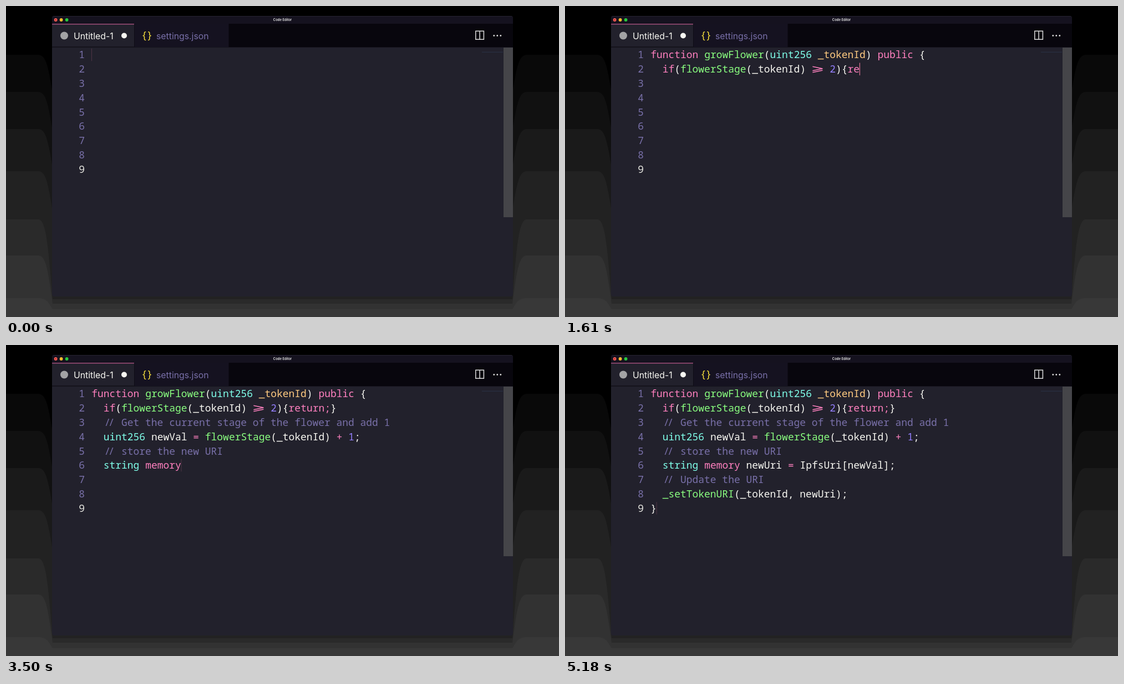
Write an HTML page that moves like this. It is 997 px wide and 561 px high and loops after 5.25 s.

```html
<!DOCTYPE html>
<html lang="en">
<head>
<meta charset="utf-8">
<title>Code Editor</title>
<style>
  html, body { margin: 0; width: 100%; height: 100%; overflow: hidden; background: #000; }
  svg { display: block; width: 997px; height: 561px; }
  .mono { font: 500 17.95px "Noto Sans Mono", "DejaVu Sans Mono", monospace; font-variant-ligatures: none; }
  .mono text { white-space: pre; }
  .ui { font: 15.8px Inter, Roboto, sans-serif; }
</style>
</head>
<body>
<svg viewBox="0 0 997 561" xmlns="http://www.w3.org/2000/svg">
  <rect width="997" height="561" fill="#000"/>
  <g id="backdrop"></g>
  <clipPath id="frame"><rect x="83" y="18" width="831" height="506" rx="4"/></clipPath>
  <g clip-path="url(#frame)">
    <rect x="83" y="18" width="831" height="506" fill="#22212c"/>
    <rect x="83" y="18" width="831" height="14" fill="#15121f"/>
    <rect x="83" y="18" width="831" height="0.8" fill="#2b2936"/>
    <rect x="83" y="32" width="831" height="42.5" fill="#08060d"/>
    <rect x="83" y="32" width="148" height="41.5" fill="#22212c"/>
    <rect x="231.5" y="32" width="170" height="42" fill="#151220"/>
    <rect x="83" y="32" width="148" height="1.4" fill="#a8507f"/>
  </g>
  <circle cx="89.6" cy="25" r="2.9" fill="#ff5f57"/>
  <circle cx="89.6" cy="25" r="1" fill="#7c1512"/>
  <circle cx="99.6" cy="25" r="2.9" fill="#febc2e"/>
  <circle cx="109.6" cy="25" r="2.9" fill="#28c840"/>
  <g class="ui">
    <text x="498.5" y="27.3" text-anchor="middle" fill="#eee" style="font-size:5.9px;font-weight:600">Code Editor</text>
    <text x="122" y="59.5" fill="#f8f8f2">Untitled-1</text>
    <text x="271" y="59.5" fill="#7970a9">settings.json</text>
  </g>
  <circle cx="105" cy="53.5" r="7" fill="#a3a3a5"/>
  <circle cx="213" cy="53.5" r="5" fill="#f8f8f2"/>
  <g class="mono" fill="#f5de3c" text-anchor="middle">
    <text x="249.5" y="59">{</text>
    <text x="258.8" y="59">}</text>
  </g>
  <path d="M846.8 45.3h14.6v15h-14.6zM854.1 45.3v15" fill="none" stroke="#dcdcdc" stroke-width="1.5"/>
  <g fill="#dcdcdc">
    <circle cx="879.8" cy="53.5" r="1.4"/>
    <circle cx="885.8" cy="53.5" r="1.4"/>
    <circle cx="891.8" cy="53.5" r="1.4"/>
  </g>
  <rect x="858" y="82.7" width="38" height="1" fill="#2c3348"/>
  <rect x="897" y="75" width="17" height="306" fill="#454549"/>
  <g id="numbers" class="mono" text-anchor="end"></g>
  <g id="code" class="mono"></g>
  <rect id="caret" width="1.1" height="22.6" fill="#ff80a8"/>
</svg>
<script>
const LOOP = 5250, STEP = 70;
const LEFT = 154.2, CHAR = 10.77, BASE = 94.4, PITCH = 25.8;
const RATE = 5.48, START = 11 - 13.3 / RATE;  // characters per step, first step
const PINK = '#ff80bf', GREEN = '#8aff80', CYAN = '#80ffea', ORANGE = '#ffca80',
      PURPLE = '#9580ff', WHITE = '#f8f8f2', GREY = '#7970a9';

// Each line: indent, pause after it (in characters), coloured runs.
const lines = [
  [0, 0, [PINK, 'function '], [GREEN, 'growFlower'], [WHITE, '('], [CYAN, 'uint256 '],
    [ORANGE, '_tokenId'], [WHITE, ') '], [PINK, 'public '], [WHITE, '{']],
  [2, 0, [PINK, 'if'], [WHITE, '('], [GREEN, 'flowerStage'], [WHITE, '(_tokenId) '],
    [PINK, '>='], [WHITE, ' '], [PURPLE, '2'], [WHITE, '){'], [PINK, 'return;'], [WHITE, '}']],
  [2, 0, [GREY, '// Get the current stage of the flower and add 1']],
  [2, 8.9, [CYAN, 'uint256 '], [WHITE, 'newVal '], [PINK, '= '], [GREEN, 'flowerStage'],
    [WHITE, '(_tokenId) '], [PINK, '+ '], [PURPLE, '1'], [WHITE, ';']],
  [2, 8.9, [GREY, '// store the new URI']],
  [2, 8.9, [CYAN, 'string '], [PINK, 'memory '], [WHITE, 'newUri '], [PINK, '= '],
    [WHITE, 'IpfsUri[newVal];']],
  [2, 8.9, [GREY, '// Update the URI']],
  [2, 8.9, [GREEN, '_setTokenURI'], [WHITE, '(_tokenId, newUri);']],
  [0, 0, [WHITE, '}']],
];

const byId = id => document.getElementById(id);
function add(parent, tag, attrs, text = '') {
  const node = document.createElementNS('http://www.w3.org/2000/svg', tag);
  for (const key in attrs) node.setAttribute(key, attrs[key]);
  node.textContent = text;
  return parent.appendChild(node);
}

// Bands of the backdrop: height at the sides, height at the window, grey level.
for (const [y, low, level] of [[88, 156, 9], [155, 225, 17], [222, 292, 26], [298, 370, 34],
  [385, 529, 42], [450, 537, 50], [527, 547, 56]]) {
  const mid = y + (low - y) * .3;
  add(byId('backdrop'), 'path', {
    d: `M0 ${y}H58C72 ${y} 76 ${mid} 84 ${low}H913C921 ${mid} 925 ${y} 939 ${y}H997V561H0Z`,
    fill: `rgb(${level},${level},${level})`
  });
}

let total = 0;
const rows = lines.map(([indent, pause, ...runs], i) => {
  const y = BASE + i * PITCH;
  add(byId('numbers'), 'text', { x: 141.9, y, fill: i === 8 ? '#e6e6e0' : GREY }, i + 1);
  let at = 0;
  const parts = runs.map(([fill, text]) => {
    const x = LEFT + (indent + at) * CHAR;
    const node = add(byId('code'), 'text', { x, y, fill });
    if (text.startsWith('//')) node.setAttribute('dx', '1.8 -3.6 1.8');
    const sign = text === '>=' && add(byId('code'), 'path', {
      d: `M${x + 1.4} ${y - 11}l18 3.8l-18 3.8M${x + 1.4} ${y - .4}l18 -3.8`,
      fill: 'none', stroke: fill, 'stroke-width': 1.5
    });
    const part = { text, at, node, sign };
    at += text.length;
    return part;
  });
  const row = { indent, parts, size: at, from: total };
  total += at + pause;
  return row;
});

function draw(time) {
  const step = Math.floor(time / STEP);
  const typed = Math.max(0, (step - START) * RATE);
  let caretRow = 0, caretCol = 0;
  rows.forEach(({ indent, parts, size, from }, i) => {
    const count = Math.max(0, Math.min(size, Math.floor(typed - from + 1e-6)));
    if (count) { caretRow = i; caretCol = indent + count; }
    for (const { text, at, node, sign } of parts) {
      const shown = text.slice(0, Math.max(0, count - at));
      const joined = sign && shown === text;
      if (sign) sign.style.display = joined ? '' : 'none';
      node.textContent = joined ? '' : shown;
    }
  });
  const caret = byId('caret');
  caret.setAttribute('x', 153.9 + caretCol * CHAR);
  caret.setAttribute('y', 76.7 + caretRow * PITCH);
  const pulse = Math.sin(Math.PI * (step / 5 + .1)) ** 2;
  caret.setAttribute('opacity', Math.min(1, .06 + pulse * 1.35));
}

const began = performance.now();
function tick() {
  draw((performance.now() - began) % LOOP);
  requestAnimationFrame(tick);
}
tick();
</script>
</body>
</html>
```
